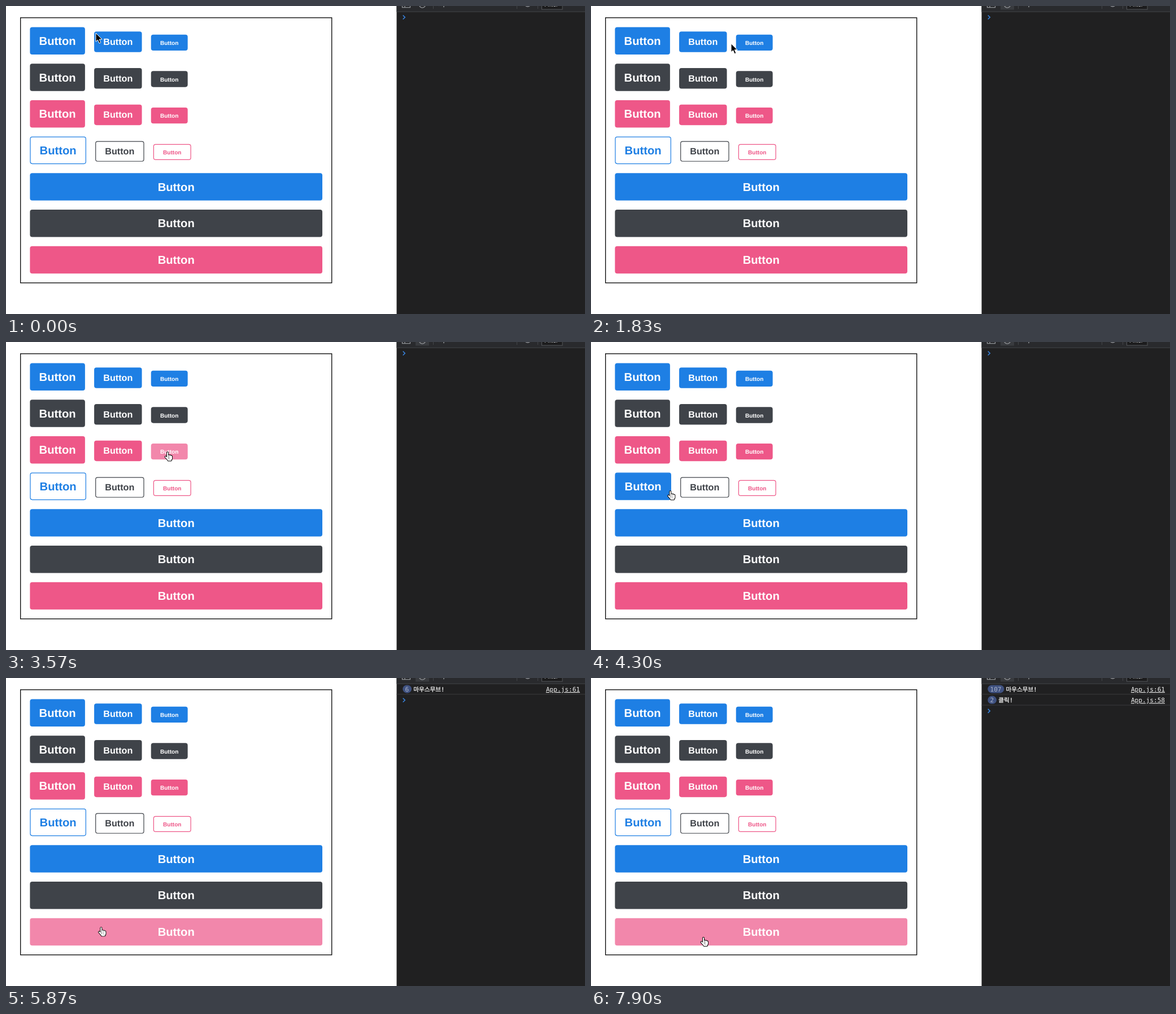
These frames come from a looping animation (1025 by 546 pixels, 8000 ms). An HTML page:

```html
<!DOCTYPE html>
<html lang="en">
<head>
<meta charset="utf-8">
<title>Buttons and console</title>
<style>
  html, body { margin: 0; width: 100%; height: 100%; overflow: hidden; background: #fff; }
  svg { display: block; }
  text { text-rendering: geometricPrecision; }
  #buttons text { font-family: "Liberation Sans", sans-serif; font-weight: 700; text-anchor: middle; }
  #console text { font: 11.1px "DejaVu Sans Mono", "Noto Sans CJK KR", "Noto Sans CJK", monospace; fill: #f1f1f1; }
  #console .message { font-size: 10.6px; font-weight: 500; fill: #fff; stroke: #fff; stroke-width: .25; }
  #console .link { text-decoration: underline; text-anchor: end; }
  #console .count { fill: #a9b2c6; }
  #console .tool { font: 11px "Roboto", sans-serif; fill: #c4c7cb; }
  #hand use { fill: none; stroke-linecap: round; stroke-linejoin: round; }
</style>
</head>
<body>
<svg width="1025" height="546" viewBox="0 0 1025 546">
  <defs>
    <path id="fingers" d="M0 1V12M2.6 6V13M5 6.5V13M7 7.5V12M-3.4 8.3L0 12L1.5 14.2H6"/>
  </defs>
  <rect width="1025" height="546" fill="#fff"/>
  <rect x="25.7" y="20.8" width="551" height="470" fill="none" stroke="#000" stroke-width="1.3"/>
  <g id="buttons" transform="translate(42.4 37.5) scale(1.011)"></g>

  <g id="console">
    <rect x="691.5" width="333.5" height="546" fill="#202021"/>
    <rect x="691.5" width="333.5" height="10" fill="#292a2d"/>
    <rect id="clearHover" x="725" width="24" height="6.5" fill="#393b3f"/>
    <path d="M691.5 10.2H1025M756.5 0V5M904.5 0V5M941.5 0V5" stroke="#434549"/>
    <g fill="none" stroke="#919498" stroke-width="1.3">
      <path d="M701.5-8V2.7H715.5V-8M706-8V2.7"/>
      <circle cx="737" cy="-2.4" r="5.5"/>
      <path d="M917-3Q923.5 5 930-3"/>
    </g>
    <text class="tool" x="764" y="0">top</text>
    <rect x="948.5" y="-10" width="36.5" height="16" fill="#1c1c1d" stroke="#55575b"/>
    <text class="tool" x="953" y="1.2">Filter</text>
    <path id="prompt" d="M702.7 16.5L706.3 20L702.7 23.5" fill="none" stroke="#3987e6" stroke-width="1.5"/>
  </g>

  <g id="cursor">
    <path id="arrow" d="M0 0V15.2L3.5 12L6 18L8.7 16.9L6.2 11H11Z" stroke="#fff"/>
    <g id="hand">
      <use href="#fingers" stroke="#000" stroke-width="4"/>
      <use href="#fingers" stroke="#fff" stroke-width="2.1"/>
    </g>
  </g>
</svg>
<script>
const LOOP = 8000;
const ROW = 64;
const $ = id => document.getElementById(id);

const tones = [
  { base: '#1e7fe4', hover: '#4898e9', active: '#1763c0' },
  { base: '#3f4349', hover: '#545b67', active: '#2c2f34' },
  { base: '#ee5788', hover: '#f287ab', active: '#e82e65' },
];
const sizes = [
  { font: 20, h: 48, top: 0 },
  { font: 16, h: 36, top: 7.75 },
  { font: 10, h: 28, top: 13 },
];

// Where the pointer turns: time, x, y
const turns = [
  [0, 159, 48], [850, 147, 70], [1230, 106, 69], [2000, 288, 66], [2230, 284, 130],
  [2470, 220, 136], [2800, 85, 140], [3050, 100, 190], [3570, 286, 195], [3750, 290, 262],
  [4450, 100, 265], [5000, 121, 306], [5300, 121, 306], [5950, 175, 461], [7050, 199, 460],
];
const sweep = { from: 5950, to: 7050, width: 70 };
const moveLog = { from: 5810, perMs: 0.0885, total: 107 };
const presses = [[7370, 7470], [7800, 7870]];

function add(parent, tag, attrs, text = '') {
  const node = document.createElementNS('http://www.w3.org/2000/svg', tag);
  for (const key in attrs) node.setAttribute(key, attrs[key]);
  node.textContent = text;
  parent.append(node);
  return node;
}

function show(node, visible) {
  node.setAttribute('visibility', visible ? 'inherit' : 'hidden');
}

const buttons = [];

function addButton(x, row, { font, h, top }, tone, { outline = false, width } = {}) {
  const y = row * ROW + top;
  const w = width ?? font * 3.222 + (outline ? 34 : 32);
  const inset = outline ? 0.6 : 0;
  const rect = add($('buttons'), 'rect', {
    x: x + inset, y: y + inset, width: w - 2 * inset, height: h - 2 * inset, rx: 4 - inset,
    stroke: outline ? tone.base : 'none', 'stroke-width': 2 * inset,
  });
  const label = add($('buttons'), 'text', { x: x + w / 2, y: row * ROW + 31, 'font-size': font }, 'Button');
  buttons.push({ x, y, w, h, tone, outline, rect, label });
  return w;
}

for (let row = 0; row < 4; row++) {
  const outline = row === 3;
  let x = 0;
  sizes.forEach((size, i) => {
    x += addButton(x, row, size, tones[outline ? i : row], { outline }) + 16;
  });
}
tones.forEach((tone, i) => addButton(0, 4 + i, sizes[0], tone, { width: 512 }));

function addMessage(top, text, link) {
  const group = add($('console'), 'g', {});
  const badge = add(group, 'rect', { x: 702.3, y: top + 2.2, height: 14.2, rx: 7.1, fill: '#3f5180' });
  const count = add(group, 'text', { class: 'count', x: 706.5, y: top + 13.3 });
  const message = add(group, 'text', { class: 'message', y: top + 13.7 }, text);
  add(group, 'text', { class: 'link', x: 1016, y: top + 13.7 }, link);
  add(group, 'path', { d: `M691.5 ${top + 18.5}H1025`, stroke: '#3a3a3d' });
  return n => {
    const width = String(n).length * 6.67 + 9;
    show(group, n > 0);
    // A single message carries no badge.
    for (const part of [badge, count]) part.style.display = n > 1 ? '' : 'none';
    badge.setAttribute('width', width);
    count.textContent = n;
    message.setAttribute('x', n > 1 ? 705.6 + width : 715);
  };
}

const setMoves = addMessage(10.3, '마우스무브!', 'App.js:61');
const setClicks = addMessage(29.6, '클릭!', 'App.js:58');

function pointerAt(t) {
  const next = turns.findIndex(turn => turn[0] > t);
  const [t1, x1, y1] = turns.at(next);
  const [t0, x0, y0] = next < 0 ? turns.at(-1) : turns[next - 1];
  const k = t1 > t0 ? (t - t0) / (t1 - t0) : 0;
  const phase = Math.min(1, Math.max(0, (t - sweep.from) / (sweep.to - sweep.from)));
  const swing = sweep.width * Math.sin(2 * Math.PI * phase) ** 2;
  return [x0 + (x1 - x0) * k + swing, y0 + (y1 - y0) * k];
}

function paintButton({ tone, outline, rect, label }, hovered, pressed) {
  const filled = !outline || hovered;
  const fill = pressed ? tone.active : hovered && !outline ? tone.hover : tone.base;
  rect.setAttribute('fill', filled ? fill : '#fff');
  label.setAttribute('fill', filled ? '#fff' : tone.base);
}

function render(t) {
  const [px, py] = pointerAt(t);
  const x = (px - 42.4) / 1.011;
  const y = (py - 37.5) / 1.011;
  const awake = t >= 870;
  const pressed = presses.some(([down, up]) => t >= down && t < up);
  const target = awake && buttons.find(b => x >= b.x && x <= b.x + b.w && y >= b.y && y <= b.y + b.h);

  buttons.forEach(b => paintButton(b, b === target, b === target && pressed));
  $('cursor').setAttribute('transform', `translate(${px} ${py})`);
  show($('hand'), target);
  show($('arrow'), !target);
  show($('clearHover'), awake);

  const elapsed = t - moveLog.from;
  const moves = elapsed < 0 ? 0 : Math.min(moveLog.total, Math.floor(1 + elapsed * moveLog.perMs));
  const clicks = presses.filter(([, up]) => t >= up).length;
  setMoves(moves);
  setClicks(clicks);
  const lines = (moves > 0) + (clicks > 0);
  $('prompt').setAttribute('transform', `translate(0 ${lines * 19.2})`);
}

const start = performance.now();
function tick() {
  render((performance.now() - start) % LOOP);
  requestAnimationFrame(tick);
}
tick();
</script>
</body>
</html>
```
